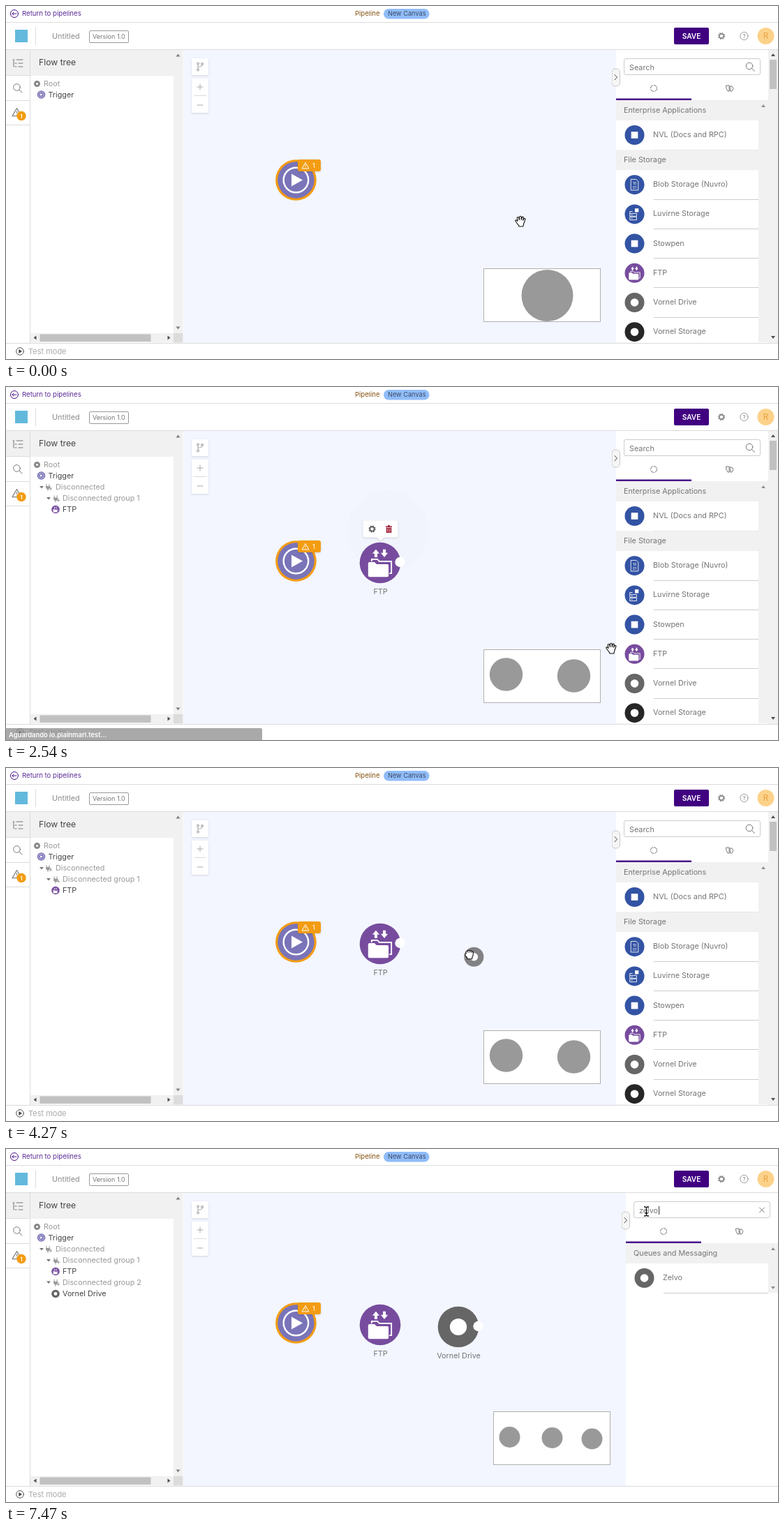
These frames come from a looping animation (1106 px wide and 506 px high, 8 s). An HTML page:

```html
<!DOCTYPE html>
<html lang="en">
<head>
<meta charset="utf-8">
<title>Pipeline editor</title>
<style>
  html, body { margin: 0; width: 100%; height: 100%; overflow: hidden; background: #fff; }
  svg { display: block; width: 100%; height: 100%; }
  text { font: 10.8px Inter, "Open Sans", sans-serif; fill: #757575; }
  .dim { fill: #999; }
  .dark { fill: #444; }
  .mid { text-anchor: middle; }
  .line { fill: none; stroke: #777; stroke-width: 1; stroke-linecap: round; stroke-linejoin: round; }
  .rule { fill: none; stroke: #dcdcdc; }
  .purple { stroke: #4a148c; }
  .bar { fill: #f1f1f1; }
  .thumb { fill: #c1c1c1; }
  .arrow { fill: #505050; }
  .white { fill: #fff; }
  .glyph { fill: none; stroke: #fff; stroke-width: 1.8; }
  .soft { filter: drop-shadow(0 1px 1.5px #0002); }
</style>
</head>
<body>
<svg viewBox="0 0 1106 506" preserveAspectRatio="none">
  <defs>
    <g id="play"><circle r="19.3" class="glyph" style="stroke-width:2.6"/><path class="white" d="M-7-9.8 10.5 0-7 9.8z"/></g>
    <g id="folder">
      <path class="white" d="M-11-13l5-6 5 6h-3v5h-4v-5zM1-14l5 6 5-6h-3v-5h-4v5z"/>
      <path class="glyph" d="M-12-2v-3h8l3 3h17v17h-3"/>
      <path class="white" d="M-17 1q0-2 2-2h7l3 3h15q2 0 2 2v14q0 2-2 2h-25q-2 0-2-2z"/>
    </g>
    <g id="doc">
      <path class="glyph" d="M-11-16h16l6 6v26h-22z"/>
      <text class="mid" y="0" style="font-size:11px;fill:#fff">10</text>
      <text class="mid" y="12" style="font-size:11px;fill:#fff">01</text>
    </g>
    <g id="server">
      <path class="glyph" d="M-14-2h20v8h-20zM-14 8h20v9h-20zM-10 2h4M-10 12h4M-14-2v-6h8"/>
      <rect class="white" x="1" y="-17" width="11" height="11"/>
    </g>
    <rect id="square" class="white" x="-10" y="-10" width="20" height="20"/>
    <circle id="dot" class="white" r="12"/>
    <g id="gear" fill="none" stroke="currentColor">
      <circle r="3.1" stroke-width="1.6"/>
      <circle r="4.5" stroke-width="1.3" stroke-dasharray="1.77"/>
    </g>
    <g id="lens"><circle class="line" cx="-1" cy="-1" r="4.8"/><path class="line" d="M2.5 2.5 6.5 6.5"/></g>
    <g id="plug" fill="#999"><path d="M-4-1h6v2q-1 3-3 3t-3-3z"/><path d="M-3-4v3M1-4v3M-1 4v2M3 0v5M1 3h4" stroke="#999"/></g>
    <path id="fold" fill="#777" d="M-3-1.5h6l-3 3.5z"/>
    <path id="up" class="arrow" d="M-3 2h6l-3-4z"/>
    <path id="warn" d="M0-4.5 5 4h-10zM0-1.5v2.5M0 2.2v.6" fill="none" stroke="currentColor" stroke-linejoin="round"/>
    <g id="open" fill="#fff" stroke="#111" stroke-width="1.1" stroke-linejoin="round">
      <path d="M-4.5 3-7-.5Q-7.6-2-6.3-2.3-5.3-2.3-4-.5L-4.8-5Q-4.8-6.6-3.6-6.5-2.7-6.4-2.3-5L-1.7-2.3-1.5-6.5Q-1.3-7.8 0-7.7 1.1-7.6 1.1-6.4L1.2-2.4 2.2-6Q2.7-7.2 3.7-6.8 4.6-6.4 4.3-5.2L3.6-1.8 5-4Q5.8-5 6.6-4.4 7.2-3.8 6.8-2.8L4.8 2.8 3.8 7H-2L-2.4 5.6z"/>
    </g>
    <g id="closed" fill="#fff" stroke="#111" stroke-width="1.1" stroke-linejoin="round">
      <path d="M-3 7V5L-6 1.5Q-6.6-.8-4.5-.8L-4.6-3.2Q-4-5-2.3-4.4-1-6 .8-4.9 2.4-5.7 3.4-4.2 5.6-4.2 5.7-2L5.4 2 4 5V7z"/>
      <path fill="none" d="M-1.8-4v2M.9-4.5v2.3M3.4-4v2"/>
    </g>
    <path id="beam" fill="none" stroke="#111" stroke-width="1.4" d="M-3.5-6.5H-1.5L0-5.5 1.5-6.5H3.5M0-5.5V5.5M-3.5 6.5H-1.5L0 5.5 1.5 6.5H3.5M-2 2.5H2"/>
    <clipPath id="listArea"><path d="M868 63h238v419h-238z"/></clipPath>
  </defs>

  <!-- canvas -->
  <path fill="#f3f6ff" d="M254 63h640v420h-640z"/>
  <path class="white soft" d="M266 75h24v24h-24zM266 104h24v49h-24z"/>
  <path class="line" style="stroke:#aaa" d="M274 116h8M278 112v8M274 142h8M275 84v6M275 87h3q3 0 3-2.5"/>
  <path class="rule" d="M269 128.5h18"/>
  <g class="line" style="stroke:#999"><circle cx="275" cy="82.5" r="1.5"/><circle cx="275" cy="91.5" r="1.5"/><circle cx="281" cy="83" r="1.5"/></g>

  <g id="ftpNode"></g>
  <g id="driveNode"></g>
  <circle cx="415.4" cy="249.5" r="29.3" fill="#f39c12"/>
  <g transform="translate(415.4 249.5) scale(.92)"><circle r="28.5" fill="#7a74b8"/><use href="#play"/></g>
  <rect class="soft" x="418" y="220" width="33" height="17" rx="3" fill="#f39c12"/>
  <use href="#warn" x="429" y="229" color="#fff"/>
  <text x="441" y="231.500" class="mid" style="fill:#fff;font-size:9.500px">1</text>
  <g id="map"></g>

  <!-- right panel -->
  <g id="panel" clip-path="url(#listArea)">
    <path class="white" d="M874 63h232v420h-232z"/>
    <rect x="885.5" y="75.5" width="195" height="23" rx="2.5" class="white" stroke="#ccc"/>
    <text id="query" x="893" y="91.5"></text>
    <path id="caret" d="M893.5 82v12" stroke="#333"/>
    <use id="find" href="#lens" x="1066" y="87"/>
    <path id="clear" class="line" d="M1065.5 84l7 7m0-7l-7 7"/>
    <circle cx="928" cy="118" r="4.6" class="line" stroke-dasharray="5.2 2"/>
    <path class="line" d="M1032 114h4v8h-2l-2-4zM1037.5 115h2.5l2 3.5-2 3.5h-2z"/>
    <path fill="#4a148c" d="M874 132.5h108v2.5h-108z"/>
    <rect id="hover" x="874" width="204" height="42" fill="#f6f6f6"/>
    <g id="lists"></g>
    <path id="track" class="bar"/>
    <use href="#up" x="1085" y="143" opacity=".6"/>
    <g id="trackEnd"><use href="#up" transform="scale(1 -1)" opacity=".6"/></g>
    <rect x="868" y="90" width="11.5" height="25" rx="5" fill="#f6f6f6" stroke="#c8c8c8"/>
    <path class="line" style="stroke:#444" d="M872 98.5l3.5 3.7-3.5 3.7"/>
  </g>
  <g id="pageScroll">
    <path class="bar" d="M1092 63h14v420h-14z"/>
    <path class="thumb" d="M1094 77h10v42h-10z"/>
    <use href="#up" x="1099" y="70"/>
    <use href="#up" transform="translate(1099 475) scale(1 -1)"/>
  </g>

  <!-- left side -->
  <path class="white" d="M0 63h253v420h-253z"/>
  <path class="bar" d="M0 63h34v36h-34zM35 63h218v37h-218zM240 63h13.5v406h-13.5zM35 469h205v13.5h-205z"/>
  <path fill="#dcdcdc" d="M240 469h13.5v13.5h-13.5z"/>
  <path class="thumb" d="M48.5 470.5h159v10.5h-159z"/>
  <path class="rule" d="M34.5 63v420M0 99.5h34M0 135.5h34M0 170.5h34"/>
  <use href="#up" x="246.5" y="70.5" opacity=".7"/>
  <use href="#up" transform="translate(246.5 461.5) scale(1 -1)" opacity=".7"/>
  <use href="#up" transform="translate(41.5 475.5) rotate(-90)"/>
  <use href="#up" transform="translate(233.5 475.5) rotate(90)"/>
  <path class="line" d="M10 77h2M15 77h9M13 82h2M18 82h6M13 87h2M18 87h6M11 78v9"/>
  <use href="#lens" x="16.5" y="117.5"/>
  <use href="#warn" transform="translate(15.5 152.5) scale(1.3)" color="#888"/>
  <circle cx="22" cy="157.5" r="6.7" fill="#f39c12"/>
  <text x="22" y="160.5" class="mid" style="fill:#fff;font-size:8px;font-weight:600">1</text>
  <text x="47" y="85" class="dark" style="font-size:12.2px">Flow tree</text>
  <circle cx="44.5" cy="111.5" r="3" fill="none" stroke="#888" stroke-width="3"/>
  <text x="54" y="115" class="dim">Root</text>
  <g id="triggerItem"></g>
  <g id="tree1"></g>
  <g id="tree2"></g>

  <!-- top bars -->
  <path class="white" d="M0 0h1106v62.5h-1106z"/>
  <path class="rule" d="M0 23.5h1106M0 62.5h1106M42.5 30v26"/>
  <circle cx="12" cy="11" r="5.5" class="line purple"/>
  <path class="line purple" d="M15 11h-6m2-2l-2 2 2 2"/>
  <text x="23" y="14" style="font-size:9.6px;fill:#5a2a96">Return to pipelines</text>
  <text x="500" y="13.5" style="font-size:9.5px;fill:#85500f">Pipeline</text>
  <rect x="541" y="4" width="65.5" height="14.5" rx="7.2" fill="#90bdf9"/>
  <text x="547" y="14" style="font-size:9.2px;fill:#3d4b68">New Canvas</text>
  <rect x="13" y="34" width="18" height="18" fill="#62b9dc"/>
  <text x="66" y="46.5" style="fill:#8a8a8a">Untitled</text>
  <rect x="119.5" y="35.5" width="56" height="17" rx="1.5" fill="none" stroke="#999"/>
  <text x="124" y="47" style="font-size:9.1px">Version 1.0</text>
  <rect x="957" y="31" width="50" height="24" rx="2" fill="#400080"/>
  <text x="982" y="46.5" class="mid" style="font-size:10.2px;font-weight:600;fill:#fff">SAVE</text>
  <use href="#gear" x="1025" y="43" color="#888"/>
  <circle cx="1057.5" cy="43" r="5.6" class="line" style="stroke:#999"/>
  <text x="1057.5" y="46" class="mid" style="font-size:8px">?</text>
  <circle cx="1088.5" cy="43" r="12" fill="#fcd28a"/>
  <text x="1088.5" y="47" class="mid" style="font-size:11.5px;fill:#e8a040">R</text>

  <!-- bottom bar -->
  <path class="white" d="M0 483h1106v23h-1106z"/>
  <path class="rule" d="M0 483.5h1106"/>
  <circle cx="20" cy="495" r="5.3" class="line" style="stroke:#555"/>
  <path class="dark" d="M18.3 492l4.7 3-4.7 3z"/>
  <text x="32" y="498.5" style="fill:#aaa;font-size:11px">Test mode</text>
  <g id="status">
    <path d="M0 489h365q2 0 2 2v15h-367z" fill="#8c8c8c" opacity=".75"/>
    <text x="4" y="501.5" style="font-size:9.4px;font-weight:600;fill:#fff">Aguardando io.plainmarl.test...</text>
  </g>

  <g id="ftpGhost" opacity=".8"></g>
  <g id="driveGhost" opacity=".8"></g>
  <use id="cursor" href="#open"/>
</svg>

<script>
const LOOP = 8000, STEP = 1000 / 15;
const BLUE = '#3353a4', PURPLE = '#774c9e', GREY = '#666', BLACK = '#262626';
const $ = id => document.getElementById(id);
const show = (id, on) => $(id).style.display = on ? '' : 'none';
const put = (id, x, y) => $(id).setAttribute('transform', `translate(${x} ${y})`);
const clamp = v => Math.max(0, Math.min(1, v));
const ramp = (t, from, to) => clamp((t - from) / (to - from));
const text = (x, y, label, cls = '') => `<text x="${x}" y="${y}" class="${cls}">${label}</text>`;
const use = (id, x, y) => `<use href="#${id}" x="${x}" y="${y}"/>`;
const disc = (x, y, r, color, glyph) =>
  `<g transform="translate(${x} ${y}) scale(${r / 29})"><circle r="29" fill="${color}"/><use href="#${glyph}"/></g>`;

// Canvas nodes with their hover toolbar
function node(x, y, color, glyph, label, key) {
  return `<circle id="${key}Halo" fill="#e4eaf6"/>` + disc(x, y, 29.3, color, glyph)
    + `<circle id="${key}Port" class="white" cx="${x + 28.5}" cy="${y - 1}" r="7.2"/>`
    + text(x + .5, y + 44.5, label, 'mid')
    + `<g id="${key}Tools" transform="translate(${x + .5} ${y - 48.5})">
      <path class="white soft" d="M-22-12h44q3 0 3 3v18q0 3-3 3h-17l-5 5-5-5h-17q-3 0-3-3v-18q0-3 3-3z"/>
      <use href="#gear" x="-12" color="#555"/>
      <path fill="#a3243b" d="M7.5-4h9v1.8h-9zM10.5-5.5h3v1.5h-3zM8.2-1.5h7.6v7h-7.6z"/>
      <path stroke="#fff" stroke-width=".8" d="M10.5-.3v4.5M13.5-.3v4.5"/></g>`;
}
$('ftpNode').innerHTML = node(536, 252, PURPLE, 'folder', 'FTP', 'ftp');
$('driveNode').innerHTML = node(648, 255, GREY, 'dot', 'Vornel Drive', 'drive');
$('ftpGhost').innerHTML = disc(0, 0, 14, PURPLE, 'folder');
$('driveGhost').innerHTML = disc(0, 0, 14, GREY, 'dot');

// Flow tree
const group = (y, n) => use('fold', 61, y) + use('plug', 72, y) + text(81, y + 3.5, 'Disconnected group ' + n, 'dim');
const leaf = (x, y, color, glyph, label) => disc(x, y, 5.8, color, glyph) + text(x + 10, y + 3.5, label, 'dark');
$('triggerItem').innerHTML = leaf(50.5, 127, '#7a74b8', 'play', 'Trigger');
$('tree1').innerHTML = use('fold', 51, 143.5) + use('plug', 61, 143) + text(71, 147, 'Disconnected', 'dim')
  + group(159.5, 1) + leaf(71, 175.5, PURPLE, 'folder', 'FTP');
$('tree2').innerHTML = group(191, 2) + leaf(71, 207.5, GREY, 'dot', 'Vornel Drive');

// Component lists: one per search result
const queue = ['Queues and Messaging', ['Zelvo', GREY, 'dot']];
const lists = [
  [['Enterprise Applications', ['NVL (Docs and RPC)', BLUE, 'square']],
   ['File Storage', ['Blob Storage (Nuvro)', BLUE, 'doc'], ['Luvirne Storage', BLUE, 'server'],
    ['Stowpen', BLUE, 'square'], ['FTP', PURPLE, 'folder'], ['Vornel Drive', GREY, 'dot'], ['Vornel Storage', BLACK, 'dot']]],
  [['Enterprise Applications', ['Zonal Ledger', BLUE, 'square']], ['File Storage', ['Zip Folder', PURPLE, 'folder']],
   queue, ['Web Services', ['Zone Lookup', GREY, 'square']]],
  [queue]
];
function listMarkup(sections, i) {
  const rowHeight = 42.2;
  let y = 135, out = '';
  for (const [heading, ...rows] of sections) {
    out += `<path class="bar" d="M874 ${y}h204v29h-204z"/>` + text(885, y + 17.5, heading);
    y += 29;
    for (const [label, color, glyph] of rows) {
      out += disc(900.5, y + 21, 14, color, glyph) + text(927, y + 24, label)
        + `<path stroke="#ccc" d="M928 ${Math.floor(y + rowHeight) + .5}h150"/>`;
      y += rowHeight;
    }
  }
  return `<g id="list${i}">${out}</g>`;
}
$('lists').innerHTML = lists.map(listMarkup).join('');

const maps = [[37, [775.5, 415]], [23.7, [716.5, 412], [813.5, 414]], [15, [707.5, 413], [768.5, 414], [825.5, 415.5]]];
function mapMarkup([r, ...spots]) {
  return '<rect x="684.5" y="376.5" width="167" height="76" class="white" stroke="#b0b0b0"/>'
    + spots.map(([x, y]) => `<circle cx="${x}" cy="${y}" r="${r}" fill="#999"/>`).join('');
}

// Pointer stops: time, x, y
const path = [[0, 737, 309], [533, 905, 391], [700, 905, 392], [1467, 546, 259], [1600, 540, 253], [1667, 539, 252],
  [1800, 537, 253], [2100, 537, 253], [2533, 867, 375], [2800, 905, 431], [2930, 905, 432], [3667, 712, 298],
  [3733, 706, 292], [4533, 649, 258], [4600, 649.5, 257], [4667, 648, 253], [4867, 647, 252], [4970, 647, 252], [5660, 917.5, 89.5]];
function pointer(t) {
  const i = path.findIndex(p => p[0] > t);
  if (i < 0) return path.at(-1).slice(1);
  if (!i) return path[0].slice(1);
  const [a, b] = [path[i - 1], path[i]], u = ramp(t, a[0], b[0]), e = u * u * (3 - 2 * u);
  return [a[1] + (b[1] - a[1]) * e, a[2] + (b[2] - a[2]) * e];
}

function tools(key, t, x, y, born, leave, gone) {
  const alpha = ramp(t, born, born + 165) * (1 - ramp(t, leave, gone));
  const grow = ramp(t, born + 66, born + 466);
  const halo = $(key + 'Halo');
  $(key + 'Tools').setAttribute('opacity', alpha);
  halo.setAttribute('opacity', alpha * .2);
  halo.setAttribute('cx', x + 11 * grow);
  halo.setAttribute('cy', y - 46);
  halo.setAttribute('r', 43 + 15 * grow);
}

const keyTimes = [6533, 6800, 7066, 7333, 7466];
let last = -1;
function render(now) {
  requestAnimationFrame(render);
  const frame = Math.floor(now % LOOP / STEP);
  if (frame === last) return;
  last = frame;
  const t = frame * STEP + .5;
  const [x, y] = pointer(t), lag = pointer(t - STEP);
  const dragFtp = t > 733 && t < 2066, dragDrive = t > 2933 && t < 4866;
  const hasFtp = t > 2066, hasDrive = t > 4866;

  const field = x > 885 && y < 99;
  $('cursor').setAttribute('href', field ? '#beam' : dragFtp || dragDrive ? '#closed' : '#open');
  put('cursor', x, y);
  show('ftpGhost', dragFtp);
  show('driveGhost', dragDrive);
  put('ftpGhost', ...lag);
  put('driveGhost', ...lag);

  show('ftpNode', hasFtp);
  show('driveNode', hasDrive);
  show('ftpPort', !hasDrive);
  show('tree1', hasFtp);
  show('tree2', hasDrive);
  $('map').innerHTML = mapMarkup(maps[hasFtp + hasDrive]);
  tools('ftp', t, 536, 252, 2066, 2540, 2940);
  tools('drive', t, 648, 255, 4866, 5400, 5866);
  $('status').setAttribute('opacity', ramp(t, 2330, 2470) * (1 - ramp(t, 2600, 2800)));

  const typed = keyTimes.filter(k => t > k).length, searching = typed > 0;
  const stage = Math.min(typed, 2), shift = searching ? 14 : 0;
  lists.forEach((_, i) => show('list' + i, i === stage));
  put('panel', shift, 0);
  put('map', shift, 0);
  show('pageScroll', !searching);
  show('find', !searching);
  show('clear', searching);
  show('trackEnd', searching);
  put('trackEnd', 1085, [0, 412, 199][stage]);
  $('track').setAttribute('d', `M1078 135h14v${[348, 284, 71][stage]}h-14z`);
  $('query').textContent = searching ? 'zelvo'.slice(0, typed) : 'Search';
  show('caret', searching || t > 5666 && t < 6200);
  put('caret', searching ? $('query').getComputedTextLength() + 1 : 0, 0);

  show('hover', x > 874 && y > 362 && y < 446);
  $('hover').setAttribute('y', y > 404 ? 404 : 362);
}
requestAnimationFrame(render);
</script>
</body>
</html>
```
